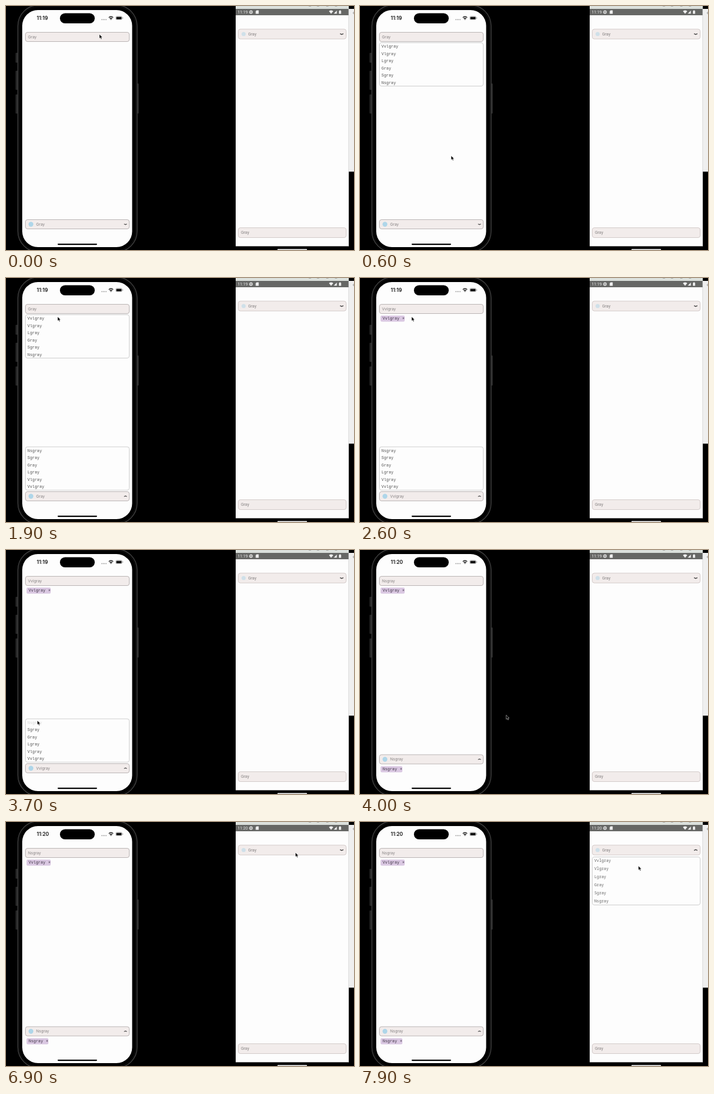
These frames come from a looping animation (600 by 422 pixels, 8000 ms). An HTML page:

```html
<!DOCTYPE html>
<html lang="en">
<head>
<meta charset="utf-8">
<style>
html, body { margin: 0; width: 100%; height: 100%; overflow: hidden; background: #000; }
svg { display: block; }
text { white-space: pre; }
.ios { font: 6.6px Inter, sans-serif; fill: #858182; }
.droid { font: 7.1px Roboto, sans-serif; fill: #858182; }
.iosList { font: 6.9px "Liberation Mono", monospace; fill: #555; }
.droidList { font: 6.8px "Noto Sans Mono", monospace; fill: #666; }
.chip { font: 6.9px "Liberation Mono", monospace; fill: #43384a; }
.clock { font: 600 8.6px Inter, sans-serif; fill: #111; }
.bar { font: 7px Roboto, sans-serif; fill: #eee; }
</style>
</head>
<body>
<svg width="600" height="422" viewBox="0 0 600 422">
  <g id="devices">
    <g fill="#292929">
      <rect x="16.5" y="81" width="4" height="17" rx="1"/>
      <rect x="16.5" y="112" width="4" height="33" rx="1"/>
      <rect x="16.5" y="153" width="4" height="33" rx="1"/>
      <rect x="225.500" y="134" width="3.500" height="52" rx="1"/>
    </g>
    <rect x="20.500" y="-1.500" width="205.500" height="427" rx="36" fill="#000" stroke="#3c3c3c" stroke-width="1.600"/>
    <rect x="23" y="1" width="200.500" height="422" rx="33" fill="none" stroke="#151515"/>
    <rect x="28" y="7" width="189.500" height="410" rx="27" fill="#fdfdfd"/>
    <rect x="93" y="12.500" width="60" height="17.500" rx="8.750"/>
    <rect x="89" y="411" width="68" height="2.200" rx="1.100"/>
    <path d="M164.500 23.500h9" stroke="#888" stroke-width="1.300" stroke-dasharray="1.300 1.200"/>
    <g fill="none" stroke="#111" stroke-width="1.500">
      <path d="M177.300 20q3.700-3.400 7.400 0M178.900 21.900q2.100-1.900 4.200 0"/>
      <rect x="189.300" y="17.800" width="10.900" height="6" rx="1.900" stroke="#999" stroke-width=".7"/>
    </g>
    <path d="M179.900 23l1.100 1.300 1.100-1.300q-1.100-.9-2.200 0z" fill="#111"/>
    <rect x="190.200" y="18.700" width="9.100" height="4.200" rx="1.200" fill="#111"/>
    <path d="M201.200 19.700v2.200" stroke="#999"/>

    <rect x="396" width="195" height="5" fill="#dbe0dc"/>
    <path d="M522 0h4M536 0h4M552 0h4M567 0h4" stroke="#777"/>
    <rect x="396" y="5" width="195" height="410.500" fill="#fdfdfd"/>
    <rect x="396" y="5" width="195" height="11" fill="#666765"/>
    <rect x="591" y="5" width="9" height="281.500" fill="#efefef"/>
    <path d="M590.700 5v410.500" stroke="#c8c8c8" stroke-width=".6"/>
    <path d="M600 10l-1.600 2 1.600 2" fill="none" stroke="#888"/>
    <rect x="468" y="420.300" width="51" height="4" rx="1" fill="#e4e4e4"/>
    <circle cx="422.300" cy="10.500" r="2.400" fill="none" stroke="#eee" stroke-width="1.200"/>
    <circle cx="422.300" cy="10.500" r=".9" fill="#eee"/>
    <path d="M432 7.500h3.700v6h-5.200v-4.500zM556.800 9q3.700-2.900 7.400 0l-3.700 4.500zM565.200 13.300h5.200v-5.500zM574 8.200h1v-.8h1.800v.8h1v5.300h-3.800z" fill="#eee"/>
  </g>
  <g id="ui"></g>
  <path id="cursor" d="M0 0v7.200l1.700-1.500 1.200 2.700 1.300-.6-1.200-2.600h2.300z" stroke="#fff" stroke-width=".5"/>
</svg>
<script>
const LOOP = 8000, STEP = 100;
const SHADES = ['Vvlgray', 'Vlgray', 'Lgray', 'Gray', 'Sgray', 'Nsgray'];
const REVERSED = [...SHADES].reverse();

// Pointer path: time, x, y
const PATH = [
  [0, 161, 49], [300, 161, 49], [800, 155, 373], [900, 155, 373], [1200, 141, 256],
  [1900, 89, 67], [2600, 89, 67], [3300, 64, 278], [3500, 54, 295], [3800, 54, 295],
  [4200, 450, 276], [4300, 450, 276], [4500, 491, 66], [4700, 491, 66], [5000, 499, 53],
  [7500, 499, 53], [7700, 509, 66], [7900, 480, 76]
];

function pointer(t) {
  const i = PATH.findIndex(p => p[0] >= t);
  if (i < 1) return PATH[i ? PATH.length - 1 : 0].slice(1);
  const [t0, x0, y0] = PATH[i - 1], [t1, x1, y1] = PATH[i];
  const k = (t - t0) / (t1 - t0), e = k * k * (3 - 2 * k);
  return [x0 + (x1 - x0) * e, y0 + (y1 - y0) * e];
}

const text = (cls, x, y, s, opacity = 1) =>
  `<text class="${cls}" x="${x}" y="${y}" opacity="${opacity}">${s}</text>`;

const box = (x, y, w, h, fill, stroke) =>
  `<rect x="${x + .5}" y="${y + .5}" width="${w - 1}" height="${h - 1}" rx="3.5" fill="${fill}" stroke="${stroke}" stroke-width=".8"/>`;

const dot = (x, y, r, fill) => `<circle cx="${x}" cy="${y}" r="${r}" fill="${fill}"/>`;

const chevron = (x, y, size, up, width) => {
  const d = up ? -size / 2 : size / 2;
  return `<path d="M${x - size} ${y - d / 2}l${size} ${d} ${size} ${-d}" fill="none" stroke="#444" stroke-width="${width}"/>`;
};

const iosField = (y, label, x = 38) =>
  box(33, y, 180, 17, '#f2eceb', '#aaa4a4') + text('ios', x, y + 10.9, label);

const droidField = (y, label, x = 405) =>
  box(400, y, 187, 18, '#f2eceb', '#c9bfbe') + text('droid', x, y + 11.2, label);

const list = (cls, x, y, w, h, gap, items, pressed) =>
  box(x, y, w, h, '#fdfdfd', '#c2c2c2') +
  items.map((s, i) => text(cls, x + 4, y + 9 + i * gap, s, s === pressed ? .22 : 1)).join('');

const chip = (y, label, w) =>
  `<rect x="35.500" y="${y}" width="${w}" height="10.5" rx="2" fill="#dac8e2"/>` +
  text('chip', 39, y + 7.2, label) + text('chip', 31.2 + w, y + 7.2, '×');

function screen(t) {
  const value = t < 2600 ? 'Gray' : t < 3800 ? 'Vvlgray' : 'Nsgray';
  const topOpen = t >= 200 && t < 2600;
  const bottomOpen = t >= 900 && t < 3800;
  const droidOpen = t >= 7400;
  const picked = t >= 3800;
  const bottomY = picked ? 353.5 : 369;
  const parts = [
    text('clock', 53, 24.2, t < 4000 ? '11:19' : '11:20'),
    text('bar', 399.5, 13, t < 6700 ? '11:19' : '11:20'),
    iosField(45, value),
    iosField(bottomY, value, 52),
    dot(43, bottomY + 8.5, 4.2, '#afd6e9'),
    chevron(206, bottomY + 8.5, 2.4, t >= 900, 1.1),
    droidField(39.5, 'Gray', 417.5),
    dot(409.700, 48.500, 3.6, '#cfe0e9'),
    chevron(578.800, 48.500, 2.9, droidOpen, 1.4),
    droidField(383, 'Gray')
  ];
  if (topOpen) parts.push(list('iosList', 33, 63, 180, 76, 12.5, SHADES, t >= 2500 && 'Vvlgray'));
  if (bottomOpen) parts.push(list('iosList', 33, 291.5, 180, 76, 12.5, REVERSED, t >= 3600 && 'Nsgray'));
  if (t >= 2600) parts.push(chip(65, 'Vvlgray', 41.5));
  if (picked) parts.push(chip(374, 'Nsgray', 37.5));
  if (droidOpen) parts.push(list('droidList', 400, 60, 187, 84, 13.9, SHADES));
  return parts.join('');
}

const ui = document.getElementById('ui');
const cursor = document.getElementById('cursor');
const start = performance.now();
let shown = '';

function draw(now) {
  const t = Math.floor(Math.max(0, now - start) % LOOP / STEP) * STEP;
  const markup = screen(t);
  if (markup !== shown) ui.innerHTML = shown = markup;
  cursor.setAttribute('transform', `translate(${pointer(t)})`);
  requestAnimationFrame(draw);
}
draw(start);
</script>
</body>
</html>
```
